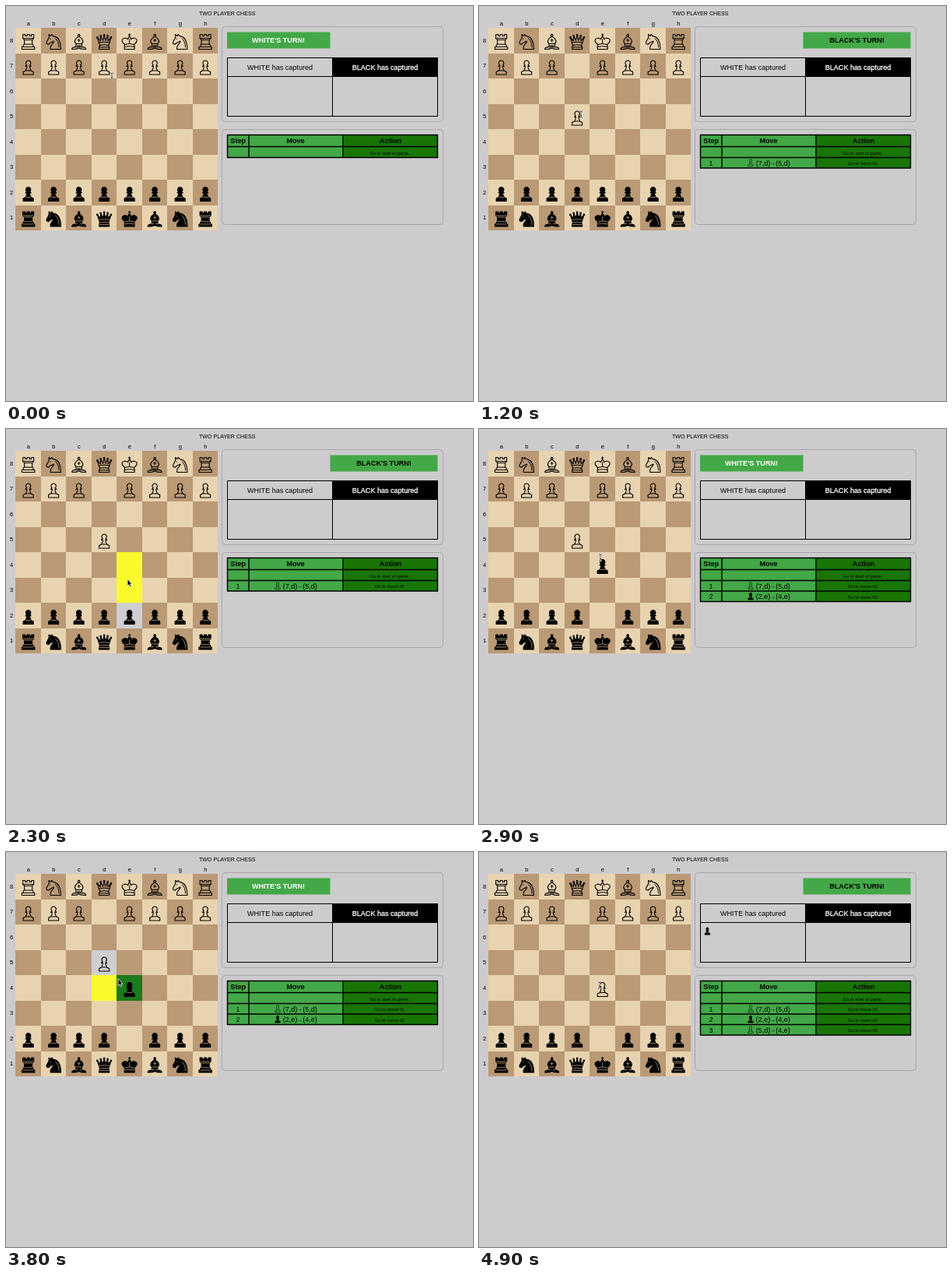
Write an HTML page that moves like this. It is 600 px wide and 507 px high and loops after 5000 ms.

```html
<!DOCTYPE html>
<html lang="en">
<head>
<meta charset="utf-8">
<title>Two player chess</title>
<style>
html, body { margin: 0; height: 100%; overflow: hidden; background: #cdcbcd; }
svg { display: block; width: 600px; height: 507px; font-family: "Liberation Sans", Arial, sans-serif; }
text { text-anchor: middle; }
</style>
</head>
<body>
<svg id="stage" viewBox="0 0 600 507">
  <g id="board"></g>
  <g id="panel"></g>
  <g id="cursor"></g>
</svg>
<script>
const CELL = 32.5, LEFT = 12, TOP = 28, LOOP = 5000;
const GREEN = '#43a847', DEEP = '#187504';
const $ = id => document.getElementById(id);

// Piece outlines and inner lines; the origin is the middle of the foot.
const SHAPES = {
  p: ['M-6.5 0V-3.5L-3.5-5Q-1.8-8-1.7-10.5H-3.6L-2-12.2A3.2 3.2 0 1 1 2-12.2L3.6-10.5H1.7Q1.8-8 3.5-5L6.5-3.5V0Z',
      'M-3.5-5H3.5'],
  r: ['M-8.2 0V-3H-6.5V-5L-5-6.5V-12L-7-13.8V-19H-4V-17H-1.6V-19H1.6V-17H4V-19H7V-13.8L5-12V-6.5L6.5-5V-3H8.2V0Z',
      'M-6.5-3H6.5M-5-6.3H5M-5-12H5M-7-14H7'],
  n: ['M-4 0Q-4.5-4-1-7.5Q.5-9 .3-10.5Q-2-9-4-8.5L-6.5-6.2L-8.8-7Q-9.8-9-8.3-10.5L-6-15V-19L-3.5-17L-2.5-19L-.5-16.8Q9-16 9.3 0Z',
      'M-5-13.3h1.2M2-14Q6.5-11 7-2'],
  b: ['M0-3.5Q-1.5-2.5-4-2.8Q-8.5-3-9 0Q-3 .3 0-1.5Q3 .3 9 0Q8.5-3 4-2.8Q1.5-2.5 0-3.5Z' +
      'M-4-4.5L-3.6-7Q-6-9-5-11.5Q-4-14 0-16.4Q4-14 5-11.5Q6-9 3.6-7L4-4.5Z' +
      'M-1.3-17.8a1.3 1.3 0 1 1 2.6 0a1.3 1.3 0 1 1-2.6 0Z',
      'M-3.6-7H3.6M0-13.5V-9M-2-11.5H2'],
  q: ['M-6.5 0V-2.5L-5.5-5L-7-9L-8.8-15L-5-10.5L-4.5-17L-1.7-11L0-18L1.7-11L4.5-17L5-10.5L8.8-15L7-9L5.5-5L6.5-2.5V0Z' +
      [[-8.8, -15], [-4.5, -17], [0, -18], [4.5, -17], [8.8, -15]]
        .map(([x, y]) => `M${x - .8} ${y}a.8 .8 0 1 1 1.6 0a.8 .8 0 1 1-1.6 0Z`).join(''),
      'M-7-8.5Q0-10 7-8.5M-5.5-5Q0-6.5 5.5-5M-6.5-2.5H6.5'],
  k: ['M-6.5 0V-3L-6-6Q-10.5-9.5-9.3-12.3Q-7-16-2-12.8Q-1.8-15 0-16.4Q1.8-15 2-12.8Q7-16 9.3-12.3Q10.5-9.5 6-6L6.5-3V0ZM0-16.4V-20M-1.7-18.4H1.7',
      'M0-7V-13M-6-6Q0-8 6-6M-6.5-3Q0-4.5 6.5-3']
};

// Selections and moves; white starts on rows 8 and 7.
const EVENTS = [
  { at: 300, pick: 'd7', free: ['d6', 'd5'] },
  { at: 1000, from: 'd7', to: 'd5' },
  { at: 2000, pick: 'e2', free: ['e3', 'e4'] },
  { at: 2700, from: 'e2', to: 'e4' },
  { at: 3500, pick: 'd5', free: ['d4'], take: 'e4' },
  { at: 4300, from: 'd5', to: 'e4' }
];

// Pointer stops: time, x, y
const STOPS = [
  [0, 136, 90], [300, 129, 82], [600, 128, 82], [1000, 131, 139], [1300, 131, 139],
  [1800, 157, 238], [2000, 157, 238], [2300, 156, 193], [2600, 156, 165], [3000, 156, 165],
  [3300, 130, 146], [3500, 130, 146], [3800, 144, 163], [4100, 155, 171], [5000, 155, 171]
];

const rect = (x, y, w, h, fill, more = '') =>
  `<rect x="${x}" y="${y}" width="${w}" height="${h}" fill="${fill}" ${more}/>`;
const text = (x, y, size, str, more = '') =>
  `<text x="${x}" y="${y}" font-size="${size}" ${more}>${str}</text>`;
const bold = 'font-weight="700"';

function piece(code, x, y, scale = 1) {
  const [body, lines] = SHAPES[code.toLowerCase()];
  const white = code < 'a';
  return `<g transform="translate(${x} ${y}) scale(${scale})" stroke-width="1.1" stroke-linejoin="round">
    <path d="${body}" fill="${white ? 'none' : '#000'}" stroke="#000"/>
    <path d="${lines}" fill="none" stroke="${white ? '#000' : '#cdb48e'}" stroke-width="${white ? 1 : .7}"/></g>`;
}

function stateAt(count) {
  const s = { men: {}, moves: [], taken: [], sel: {} };
  [...'abcdefgh'].forEach((c, i) => {
    s.men[c + 8] = 'RNBQKBNR'[i];
    s.men[c + 7] = 'P';
    s.men[c + 2] = 'p';
    s.men[c + 1] = 'rnbqkbnr'[i];
  });
  for (const e of EVENTS.slice(0, count)) {
    s.sel = e;
    if (e.pick) continue;
    const man = s.men[e.from];
    if (s.men[e.to]) s.taken.push(s.men[e.to]);
    s.men[e.to] = man;
    delete s.men[e.from];
    s.moves.push([man, e.from, e.to]);
  }
  return s;
}

function drawBoard({ men, sel }) {
  let out = text(284.2, 11.7, 7.1, 'TWO PLAYER CHESS'), tops = '';
  for (let i = 0; i < 8; i++) {
    const mid = (i + .5) * CELL;
    out += text(LEFT + mid + .5, 25.3, 7.5, 'abcdefgh'[i]) + text(7, TOP + mid + 2.6, 7.5, 8 - i);
    for (let j = 0; j < 8; j++) {
      const id = 'abcdefgh'[j] + (8 - i);
      const fill = id === sel.pick ? '#cfced0' : id === sel.take ? '#1b7a1b' :
        sel.free?.includes(id) ? '#faf92b' : (i + j) % 2 ? '#ba9975' : '#e8d3b0';
      out += rect(LEFT + j * CELL, TOP + i * CELL, CELL, CELL, fill, 'shape-rendering="crispEdges"');
      if (men[id]) tops += piece(men[id], LEFT + (j + .5) * CELL + .4, TOP + mid + 11.2);
    }
  }
  return out + tops;
}

function drawPanel({ moves, taken }) {
  const black = moves.length % 2;
  const frame = y => rect(277.5, y, 284, 122, 'none', 'rx="4" stroke="#a9a7aa"');
  let out = frame(26.5) + frame(158.5);

  out += black
    ? rect(416.5, 33.5, 138, 21, GREEN) + text(485.5, 47.2, 9.05, "BLACK'S TURN!", bold)
    : rect(284, 33.5, 132.5, 21, GREEN) + text(350, 47.2, 9.05, "WHITE'S TURN!", bold + ' fill="#fff"');

  out += rect(419.5, 66.5, 135, 24, '#000') +
    '<path d="M284.5 66.5H554.5V141.5H284.5ZM284.5 90.5H554.5M419.5 66.5V141.5" fill="none" stroke="#000"/>' +
    text(352, 81.7, 9.05, 'WHITE has captured') +
    text(487, 81.7, 9.05, 'BLACK has captured', 'fill="#fff" stroke="#fff" stroke-width=".3"');
  taken.forEach((m, i) => out += piece(m, 293.4 + i * 10, 106.2, .52));

  const rows = [165.5, 180.5];
  for (let i = 0; i <= moves.length; i++) rows.push(194.5 + i * 13.5);
  const end = rows[rows.length - 1], high = end - 165.5;
  out += rect(284.5, 165.5, 148.5, high, GREEN) + rect(433, 165.5, 121.5, high, DEEP) +
    `<path d="${rows.map(y => `M284 ${y}H555`).join('')}${[284.5, 312, 433, 554.5].map(x => `M${x} 165V${end + .5}`).join('')}" stroke="#000" stroke-width="1.4"/>` +
    text(298.2, 176.4, 9.1, 'Step', bold) + text(372, 176.4, 9.1, 'Move', bold) +
    text(494, 176.4, 9.1, 'Action', bold) + text(493, 190.5, 5.8, 'Go to start of game.');
  moves.forEach(([man, from, to], i) => {
    const y = 204.6 + i * 13.5, spot = id => `(${id[1]},${id[0]})`;
    out += text(298, y, 9, i + 1) + piece(man, 349, y + 1, .5) + text(365, y, 9, spot(from)) +
      text(377.8, y - .6, 7, '→') + text(390.5, y, 9, spot(to)) +
      text(493, y - .6, 5.8, 'Go to move #' + (i + 1));
  });
  return out;
}

function pointer(t, men) {
  if (t >= 500 && t < 700) return '';
  const i = STOPS.findIndex(s => s[0] > t);
  const [t0, x0, y0] = STOPS[i - 1], [t1, x1, y1] = STOPS[i];
  const u = (t - t0) / (t1 - t0), k = u * u * (3 - 2 * u);
  const x = x0 + (x1 - x0) * k, y = y0 + (y1 - y0) * k;
  const col = Math.floor((x - LEFT) / CELL), row = Math.floor((y - TOP) / CELL);
  // A text beam shows over a piece, an arrow elsewhere.
  const beam = men['abcdefgh'[col] + (8 - row)] && Math.abs(x - LEFT - (col + .5) * CELL) < 12;
  const place = `transform="translate(${x} ${y})"`;
  if (!beam) return `<path ${place} d="M0-.5V8.5L1.9 6.8L3.3 9.8L4.9 9L3.5 6.2H6Z" stroke="#fff" stroke-width=".8"/>`;
  const d = 'M-2-4.3Q0-4.3 0-3Q0-4.3 2-4.3M0-3V3M-2 4.3Q0 4.3 0 3Q0 4.3 2 4.3M-1 1.5H1';
  return `<g ${place} fill="none"><path d="${d}" stroke="#fff" stroke-width="1.8"/><path d="${d}" stroke="#222" stroke-width=".8"/></g>`;
}

let shown = -1, state;
function draw() {
  const t = Math.floor(performance.now() % LOOP / 100) * 100;
  const count = EVENTS.filter(e => e.at <= t).length;
  if (count !== shown) {
    shown = count;
    state = stateAt(count);
    $('board').innerHTML = drawBoard(state);
    $('panel').innerHTML = drawPanel(state);
  }
  $('cursor').innerHTML = pointer(t, state.men);
  requestAnimationFrame(draw);
}
draw();
</script>
</body>
</html>
```
